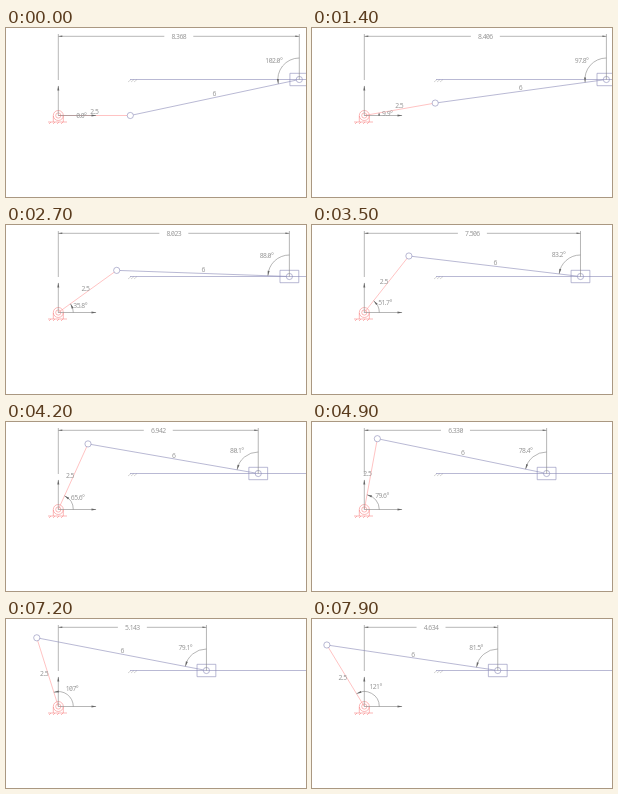
An HTML page for the animation above (8000 ms loop, 300 by 169 pixels).

```html
<!DOCTYPE html>
<html lang="en">
<head>
<meta charset="utf-8">
<title>Offset slider-crank</title>
<style>
  html, body { margin: 0; width: 100%; height: 100%; overflow: hidden; background: #fff; }
  svg { display: block; width: 100vw; height: 100vh; fill: none; stroke-width: .6; }
  .ink { stroke: #858585; }
  .link { stroke: #8a8ab8; }
  .crank { stroke: #ff9a9a; }
  .ground { stroke: #f98888; }
  .hatch { stroke: #aaa; stroke-width: .5; }
  .head { fill: #666; }
  text {
    font: 6.8px "Noto Sans", "Open Sans", sans-serif;
    font-variant-numeric: slashed-zero;
    letter-spacing: -.55px;
    fill: #999;
    text-anchor: middle;
  }
</style>
</head>
<body>
<svg viewBox="0 0 300 169">
  <g class="ground">
    <circle cx="52.3" cy="87.5" r="5"/>
    <circle cx="52.3" cy="87.5" r="2.6"/>
    <path d="M47.3 88V94M57.3 88V94M42 94H61M45 94l-2 2M49 94l-2 2M53 94l-2 2M57 94l-2 2"/>
  </g>
  <path class="hatch" d="M125 51.5l-3 2.5M128 51.5l-3 2.5M131 51.5l-3 2.5"/>
  <path class="link" d="M124 51.5H300"/>
  <path class="crank" id="crank"/>
  <path class="ink" d="M52.3 6V52M52.3 87.5V58M52.3 87.5H90"/>
  <path class="link" id="link"/>
  <path class="ink" id="dims"/>
  <path class="head" id="heads"/>
  <text id="dist"></text>
  <text id="crankLen">2.5</text>
  <text id="linkLen">6</text>
  <text id="crankAngle"></text>
  <text id="linkAngle"></text>
</svg>
<script>
const UNIT = 28.8, CRANK = 2.5, ROD = 6, OFFSET = 1.25;
const STEP = 2 * Math.PI / 181, PIN = 3.1, DIM_Y = 8.3;
const O = { x: 52.3, y: 87.5 };
const { sin, cos, atan2, asin, sqrt, min, floor, PI } = Math;
const el = id => document.getElementById(id);
const fix = n => n.toFixed(2);
const pt = (x, y) => `${fix(x)} ${fix(y)}`;
const deg = a => a * 180 / PI;

// angles run counter-clockwise from the x axis
const polar = (c, r, a) => ({ x: c.x + r * cos(a), y: c.y - r * sin(a) });
const line = (a, b) => `M${pt(a.x, a.y)}L${pt(b.x, b.y)}`;
const circle = (c, r) =>
  `M${pt(c.x - r, c.y)}a${r} ${r} 0 1 0 ${2 * r} 0a${r} ${r} 0 1 0 ${-2 * r} 0Z`;

function arc(c, r, from, to) {
  const a = polar(c, r, from), b = polar(c, r, to);
  return `M${pt(a.x, a.y)}A${r} ${r} 0 0 0 ${pt(b.x, b.y)}`;
}

function head(tip, dir, len = 5, half = 1) {
  const base = polar(tip, -len, dir);
  const a = polar(base, half, dir + PI / 2), b = polar(base, half, dir - PI / 2);
  return `M${pt(tip.x, tip.y)}L${pt(a.x, a.y)}L${pt(b.x, b.y)}Z`;
}

function label(id, x, y, text) {
  const t = el(id);
  t.setAttribute("x", fix(x));
  t.setAttribute("y", fix(y + 2.4));
  if (text !== undefined) t.textContent = text;
}

function lengthLabel(id, a, b) {
  const dir = atan2(a.y - b.y, b.x - a.x);
  const p = polar({ x: (a.x + b.x) / 2, y: (a.y + b.y) / 2 }, 3.6, dir + PI / 2);
  label(id, p.x, p.y);
}

// ten steps a second, with a one-second hold at steps 4 and 45
function stepAt(ms) {
  const k = floor(ms / 100);
  if (k < 14) return min(k, 4);
  if (k < 64) return min(k - 9, 45);
  return k - 18;
}

function draw(step) {
  const th = step * STEP;
  const rise = OFFSET - CRANK * sin(th);
  const dist = CRANK * cos(th) + sqrt(ROD * ROD - rise * rise);
  const swing = PI / 2 + asin(rise / ROD);
  const pin = polar(O, CRANK * UNIT, th);
  const slider = { x: O.x + dist * UNIT, y: O.y - OFFSET * UNIT };
  const rod = swing - PI / 2;
  const mid = (O.x + slider.x) / 2;

  el("crank").setAttribute("d", line(O, polar(pin, -PIN, th)));
  el("link").setAttribute("d",
    line(polar(pin, PIN, rod), polar(slider, -PIN, rod)) +
    circle(pin, PIN) + circle(slider, PIN) +
    `M${pt(slider.x - 9.4, slider.y - 6.2)}h18.8v12.4h-18.8Z`);

  el("dims").setAttribute("d",
    `M${pt(O.x, DIM_Y)}H${fix(mid - 14.5)}M${pt(mid + 14.5, DIM_Y)}H${fix(slider.x)}` +
    `M${pt(slider.x, 6)}V${fix(slider.y)}` +
    arc(O, 15, 0, th) + arc(slider, 21.5, PI / 2, PI / 2 + swing));

  el("heads").setAttribute("d",
    head({ x: O.x, y: DIM_Y }, PI, 4, .7) +
    head({ x: slider.x, y: DIM_Y }, 0, 4, .7) +
    head({ x: O.x, y: 57.5 }, PI / 2) +
    head({ x: 90.5, y: O.y }, 0) +
    head(polar(O, 15, th), th + PI / 2 - .17, min(5, 15 * th)) +
    head(polar(slider, 21.5, PI / 2 + swing), PI + swing - .12));

  // the distance is cut, not rounded, to three decimals
  label("dist", mid, DIM_Y, (floor(dist * 1000) / 1000).toFixed(3));
  lengthLabel("crankLen", O, pin);
  lengthLabel("linkLen", pin, slider);

  const a = polar(O, 23, th / 2), b = polar(slider, 31, PI / 2 + swing / 2);
  const turn = deg(th);
  label("crankAngle", a.x, a.y + .4, turn.toFixed(turn < 100 ? 1 : 0) + "°");
  label("linkAngle", b.x - 1.4, b.y + 1, deg(swing).toFixed(1) + "°");
}

const start = performance.now();
let last = -1;
function tick() {
  const step = stepAt((performance.now() - start) % 8000);
  if (step !== last) draw(last = step);
  requestAnimationFrame(tick);
}
tick();
</script>
</body>
</html>
```
